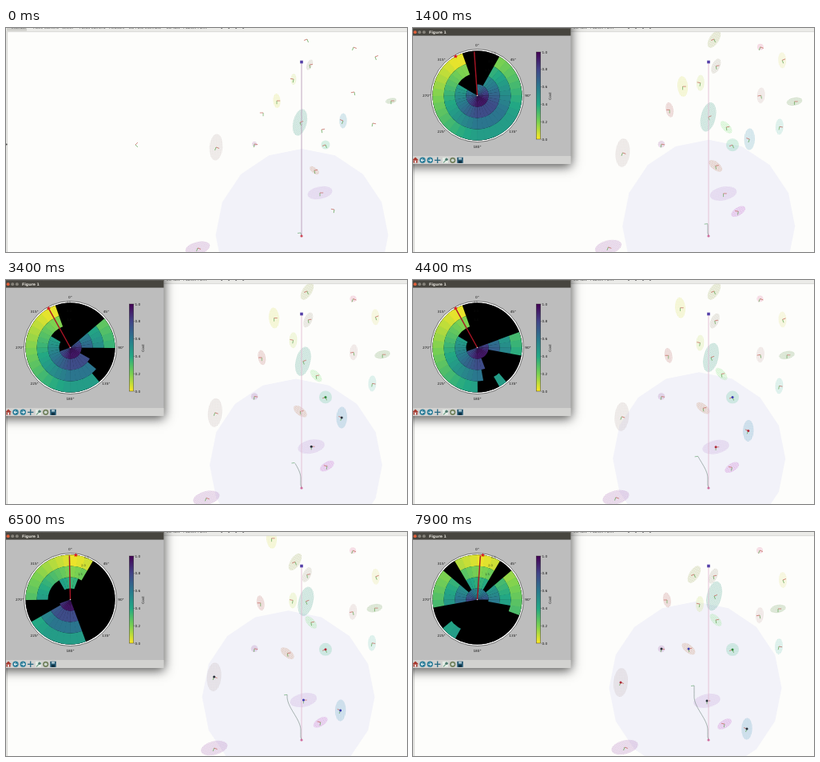
An HTML page with a canvas for the animation above (8 s loop, 502x280 px).

```html
<!DOCTYPE html>
<html lang="en">
<head>
<meta charset="utf-8">
<title>Landmark map and polar cost</title>
<style>
  html, body { margin: 0; width: 100%; height: 100%; overflow: hidden; background: #fdfdfb; }
  canvas, svg { position: absolute; left: 0; top: 0; width: 502px; height: 280px; }
  text { font-family: "DejaVu Sans", sans-serif; font-size: 4.2px; fill: #161616; }
  .mid { text-anchor: middle; }
  .menu { font-size: 4.6px; fill: #555; }
  .title { font-size: 4.7px; font-weight: bold; fill: #e4e1da; }
  .tick { font-size: 3.6px; text-anchor: middle; opacity: .7; }
</style>
</head>
<body>
<canvas></canvas>
<svg viewBox="0 0 502 280"><g id="menu"></g><g id="labels"></g></svg>
<script>
const LOOP = 8, STEP = .1, OPEN = .3;   // seconds
const canvas = document.querySelector('canvas');
const ctx = canvas.getContext('2d');
const scale = window.devicePixelRatio || 1;
canvas.width = 502 * scale;
canvas.height = 280 * scale;

const mix = (a, b, u) => a + (b - a) * u;
const clamp = v => Math.max(0, Math.min(1, v));
const rad = d => d * Math.PI / 180;
const ramp = (t, from, to) => clamp((t - from) / (to - from));
const ease = (t, from, to) => {
  const u = ramp(t, from, to);
  return u * u * (3 - 2 * u);
};

function line(color, width, ...p) {
  ctx.strokeStyle = color;
  ctx.lineWidth = width;
  ctx.beginPath();
  for (let i = 0; i < p.length; i += 2) ctx.lineTo(p[i], p[i + 1]);
  ctx.stroke();
}
function box(color, x, y, w, h) {
  ctx.fillStyle = color;
  ctx.fillRect(x, y, w, h);
}
function dot(color, x, y, r) {
  ctx.fillStyle = color;
  ctx.beginPath();
  ctx.arc(x, y, r, 0, 7);
  ctx.fill();
}

// ---------- map ----------
const marks = [];
// Position, total drift and long radius; each ellipse stretches along its drift
function mark(color, x, y, dx, dy, size, opts = {}) {
  const still = Math.hypot(dx, dy) < 3;
  marks.push({
    color, x, y, dx, dy, size, delay: 0, seen: false, active: LOOP, ...opts,
    width: still ? size : size * .5,
    tilt: still ? 0 : Math.atan2(dy, dx) + Math.PI / 2
  });
}
const seen = true;
mark('#9aa55a', 377, 14, -25, 39, 12, { delay: 4.4 });
mark('#a8a090', 380, 46, -4, 9, 10, { seen });
mark('#d8e05a', 339, 91, -8, -101, 13, { seen });
mark('#c4e070', 360, 64, -1, 26, 10, { seen });
mark('#e0709a', 435, 24, -1, -1, 4);
mark('#e2e280', 462, 36, 1, 24, 10);
mark('#c8a8a8', 436, 80, -2, 24, 10);
mark('#6a9a5a', 482, 91, -25, 5, 10, { seen });
mark('#70c8b8', 459, 119, -1, 24, 10);
mark('#4a9ab8', 422, 116, -4, 130, 13.5, { seen, active: 3 });
mark('#3a9a80', 368, 118, 9, -38, 18.5, { seen });
mark('#70e070', 395, 127, -16, -17, 9.5);
mark('#b86a6a', 322, 106, -4, -21, 9.5);
mark('#a060a8', 311, 145, 0, 1, 4.3, { seen, active: 7 });
mark('#b8a8a8', 263, 149, -3, 39, 18, { seen, active: 6 });
mark('#4ac090', 400, 146, 0, 1, 8, { seen, active: 3 });
mark('#c07a50', 386, 178, -41, -32, 10, { seen, active: 7 });
mark('#b890d0', 393, 206, -25, 5, 17, { seen, active: 2 });
mark('#c050c8', 411, 227, -21, 13, 10);
mark('#a060b0', 240, 275, 25, -6, 17, { seen });

const DOTS = ['#28303a', '#b02838', '#2f8a3a', '#3a3ab0'];
const robot = t => [369 - 17 * ease(t, 1, 6.2), 256 - 8.1 * t];

function axes(x, y, turn, flip) {
  ctx.save();
  ctx.translate(x, y);
  ctx.rotate(turn);
  line('#63a657', .7, 0, 0, 0, 4.2);
  line('#c4665c', .7, 0, 0, 4.2 * flip, 0);
  ctx.restore();
}

function drawMark(m, i, t) {
  const u = ramp(t, m.delay, 7.9);
  const x = m.x + m.dx * u, y = m.y + m.dy * u;
  const first = !m.seen ? 0 : m.size > 15 ? .92 : .7;
  const grow = mix(first, 1, ramp(t, 0, .9));
  if (grow > .05) {
    const rx = m.width * grow, ry = m.size * grow;
    ctx.save();
    ctx.translate(x, y);
    ctx.rotate(m.tilt);
    ctx.beginPath();
    ctx.ellipse(0, 0, rx, ry, 0, 0, 7);
    ctx.globalAlpha = .16;
    ctx.fillStyle = m.color;
    ctx.fill();
    ctx.clip();
    ctx.globalAlpha = .32;
    ctx.setLineDash([1, 1]);
    for (let k = -Math.floor(rx / 2) * 2; k <= rx; k += 2) line(m.color, .8, k, -ry, k, ry);
    ctx.restore();
  }
  axes(x, y, (i % 5 - 2) * .18, i % 3 ? 1 : -1);
  if (t >= m.active) dot(DOTS[(Math.floor(t) + i) % 4], x, y, 1.5);
}

function drawMap(t) {
  box('#fdfdfb', 0, 0, 502, 280);
  const [x, y] = robot(t);

  ctx.fillStyle = '#f2f2f9';
  ctx.beginPath();
  for (let k = 0; k < 16; k++) {
    const a = k * Math.PI / 8;
    ctx.lineTo(x + 1.5 + 108 * Math.cos(a), y + 3 + 108 * Math.sin(a));
  }
  ctx.fill();

  marks.forEach((m, i) => drawMark(m, i, t));
  axes(162, 146, -.8, 1);

  line(t < OPEN ? '#b99cb8' : '#e3bdd2', .9, 370, 42, 370, 260);
  const trail = [370, 260];
  for (let s = 0; s <= t; s += STEP) trail.push(...robot(s));
  line('#8a9a96', .8, ...trail);
  line('#6cab76', .7, x - 4, y + .5, x, y);
  box('#5540a8', 368.2, 40.7, 3.6, 3.6);
  dot(t < OPEN ? '#d04858' : '#d070a0', 370, 260, 1.6);

  box('#ebebe8', 0, 0, 502, 4.6);
  box('#d0d0cc', 0, 4.4, 502, .7);
  box('#e6e6e3', 0, 5, 1.6, 275);
  box('#c6c6c2', 1.5, 5, .6, 275);
  dot('#444', .6, 145.5, 1);
  box('#cfcfcb', 1, 0, 25, 3.6);
  for (let k = 0; k < 4; k++) box('#888', 269 + 9 * k, 0, 2, 1);
}

// ---------- polar figure ----------
const CX = 80.5, CY = 84.5, RING = 14, CELL = 10;
const VIRIDIS = [[253, 231, 37], [122, 209, 81], [34, 168, 132], [42, 120, 142], [65, 68, 135], [68, 1, 84]];
function viridis(v) {
  const p = clamp(v) * 5, i = Math.min(4, Math.floor(p));
  return `rgb(${VIRIDIS[i].map((c, k) => Math.round(mix(c, VIRIDIS[i + 1][k], p - i)))})`;
}
const polar = (deg, r) => [CX + r * Math.sin(rad(deg)), CY - r * Math.cos(rad(deg))];
const turnTo = (a, b) => Math.abs((a - b + 900) % 360 - 180);
const snap = a => Math.round(a / CELL) * CELL;
const within = (a, from, to) => (a - snap(from) + 720) % 360 < snap(to) - snap(from);

const needleAt = t => -4 - 25 * ease(t, 1.4, 2.8) + 33 * ease(t, 5.3, 6.9);
const starAt = t => -29 + 36 * ease(t, 4.8, 6.4);

// Obstacles hide wedges of cells that widen and swing as the robot moves
function isBlocked(a, ring, t) {
  const inner = 3 - ring;
  const frontEnd = 32 + 130 * (t / 6.5) ** 3.5;
  if (ring === 3 && t > 4 && turnTo(a + 5, 145 + 21.7 * (t - 4.4)) < CELL) return false;
  if (t > 7.2) return turnTo(a + 5, 40) < CELL && ring > 0 || turnTo(a + 5, -40) < CELL && ring > 0
    || within(a, 106 - 4 * inner, 256);
  if (ring === 0) return within(a, Math.max(-110, -40 * t), t < 3 ? 0 : frontEnd);
  if (within(a, -20 + 50 * ramp(t, 4.7, 6.5) - 4 * inner, frontEnd)) return true;
  const swing = -45 * ramp(t, 5.5, 6.5);
  if (ring === 1 && within(a, -60 + swing, 10 + swing)) return true;
  if (t > 6 && within(a, -120, -90)) return true;
  return t > 1.9 && t < 5
    && within(a, 70 + 15 * (t - 2.4), 100 + 40 * (t - 2.4) - 12 * inner);
}

function drawStar(x, y) {
  ctx.fillStyle = '#d81820';
  ctx.beginPath();
  for (let k = 0; k < 10; k++) {
    const a = k * Math.PI / 5, r = k % 2 ? 1.2 : 2.9;
    ctx.lineTo(x + r * Math.sin(a), y - r * Math.cos(a));
  }
  ctx.fill();
}

function drawDisc(t) {
  dot('#fff', CX, CY, 58);
  ctx.strokeStyle = '#222';
  ctx.lineWidth = .6;
  ctx.stroke();
  dot('#000', CX, CY, 4 * RING);

  const goal = starAt(t);
  for (let ring = 3; ring >= 0; ring--) {
    dot('#000', CX, CY, (ring + 1) * RING);
    for (let a = -180; a < 180; a += CELL) {
      if (isBlocked(a, ring, t)) continue;
      const off = turnTo(a + 5, goal);
      ctx.fillStyle = viridis(.02 + .43 * Math.min(1, off / 150) + .16 * (3 - ring));
      ctx.beginPath();
      ctx.moveTo(CX, CY);
      ctx.arc(CX, CY, (ring + 1) * RING, rad(a - 90.4), rad(a - 89.6 + CELL));
      ctx.fill();
    }
  }
  line('#a81424', 1.4, CX, CY, ...polar(needleAt(t), 55));
  drawStar(...polar(goal, 56));
  dot('#ddd', CX, CY, .8);
}

function drawIcons() {
  const y = 165.3;
  ctx.fillStyle = '#a83a30';
  ctx.beginPath();
  ctx.moveTo(-1, y);
  ctx.lineTo(3, y - 3.8);
  ctx.lineTo(7, y);
  ctx.fill();
  box('#a83a30', .5, y, 5, 3.3);
  box('#eee', 2, y + .5, 2, 2.8);
  [[12, -1], [21.3, 1]].forEach(([x, d]) => {
    dot('#2f7f9a', x, y, 3.7);
    line('#fff', 1, x - 2 * d, y, x + 2 * d, y);
    line('#fff', 1, x, y - 1.8, x + 2 * d, y, x, y + 1.8);
  });
  line('#286a84', 1.3, 27, y, 34.4, y);
  line('#286a84', 1.3, 30.7, y - 3.7, 30.7, y + 3.7);
  box('#e4ede6', 37, y - 3.4, 7, 6.8);
  line('#6a9a80', 1.1, 38, y + 3, 41, y);
  dot('#507a70', 42, y - 1, 1.8);
  dot('#71805c', 49.7, y, 3.6);
  dot('#cfd8d0', 49.7, y, 1.9);
  box('#1f5570', 55.3, y - 3.6, 7.4, 7.2);
  box('#a9c3cd', 57, y - 3.2, 4, 2.5);
  box('#0e2c3b', 57, y + 1, 4, 2.4);
}

function drawFigure(t) {
  ctx.save();
  ctx.shadowColor = 'rgba(0,0,0,.7)';
  ctx.shadowBlur = 13 * scale;
  ctx.shadowOffsetY = 3 * scale;
  box('#bdbdbd', -12, -12, 209.5, 182);
  ctx.restore();
  box('#47453f', 0, 0, 197.5, 9.6);
  box('#5b5953', 0, 0, 197.5, 1);
  for (let k = 0; k < 3; k++) dot(k ? '#85827a' : '#e0603a', 2.6 + 5.6 * k, 5.2, 2);
  box('#d2d2d0', 0, 160, 197.5, 10);
  drawIcons();
  drawDisc(t);

  const grad = ctx.createLinearGradient(0, 30, 0, 139);
  for (let k = 0; k <= 5; k++) grad.addColorStop(k / 5, viridis(1 - k / 5));
  box(grad, 154.3, 30, 5.4, 109);
  ctx.strokeStyle = '#222';
  ctx.lineWidth = .4;
  ctx.strokeRect(154.3, 30, 5.4, 109);
  for (let k = 0; k < 6; k++) line('#222', .4, 159.7, 30 + k * 21.8, 160.8, 30 + k * 21.8);
}

// ---------- text ----------
const labels = document.getElementById('labels');
const menu = document.getElementById('menu');
function label(parent, str, x, y, cls = '', turn = 0) {
  const el = document.createElementNS('http://www.w3.org/2000/svg', 'text');
  el.textContent = str;
  const attrs = { x, y, class: cls, transform: `rotate(${turn} ${x} ${y})` };
  Object.entries(attrs).forEach(([k, v]) => el.setAttribute(k, v));
  parent.append(el);
  return el;
}
[['Interact', 7], ['Move Camera', 34], ['Select', 70], ['Focus Camera', 92], ['Measure', 129],
 ['2D Pose Estimate', 154], ['2D Nav', 201], ['Publish Point', 222]]
  .forEach(([s, x]) => label(menu, s, x, 1.1, 'menu'));
label(labels, 'Figure 1', 20, 7.2, 'title');
for (let a = 0; a < 360; a += 45) {
  const [x, y] = polar(a, 63.5);
  label(labels, a + '°', x, y + 1.6, 'mid');
}
for (let k = 0; k < 6; k++) label(labels, (1 - k / 5).toFixed(1), 161.4, 31.6 + k * 21.8);
label(labels, 'Cost', 172.5, 85, 'mid', -90);
const ticks = ['2.5', '2.0', '1.5'].map(s => label(labels, s, 0, 0, 'tick'));

function render(t) {
  ctx.setTransform(scale, 0, 0, scale, 0, 0);
  drawMap(t);
  const open = t >= OPEN;
  labels.style.display = open ? '' : 'none';
  if (!open) return;
  drawFigure(t);
  const angle = t >= 1.9 && t < 6 ? -2 : 21;
  ticks.forEach((el, k) => {
    const [x, y] = polar(angle, 57 - k * 11.2);
    el.setAttribute('x', x);
    el.setAttribute('y', y + 1.5);
  });
}

let start = null, shown = 0;
function tick(now) {
  if (start === null) start = now;
  const step = Math.floor((now - start) / 1000 % LOOP / STEP + 1e-6);
  if (step !== shown) render((shown = step) * STEP);
  requestAnimationFrame(tick);
}
render(0);
requestAnimationFrame(tick);
</script>
</body>
</html>
```
